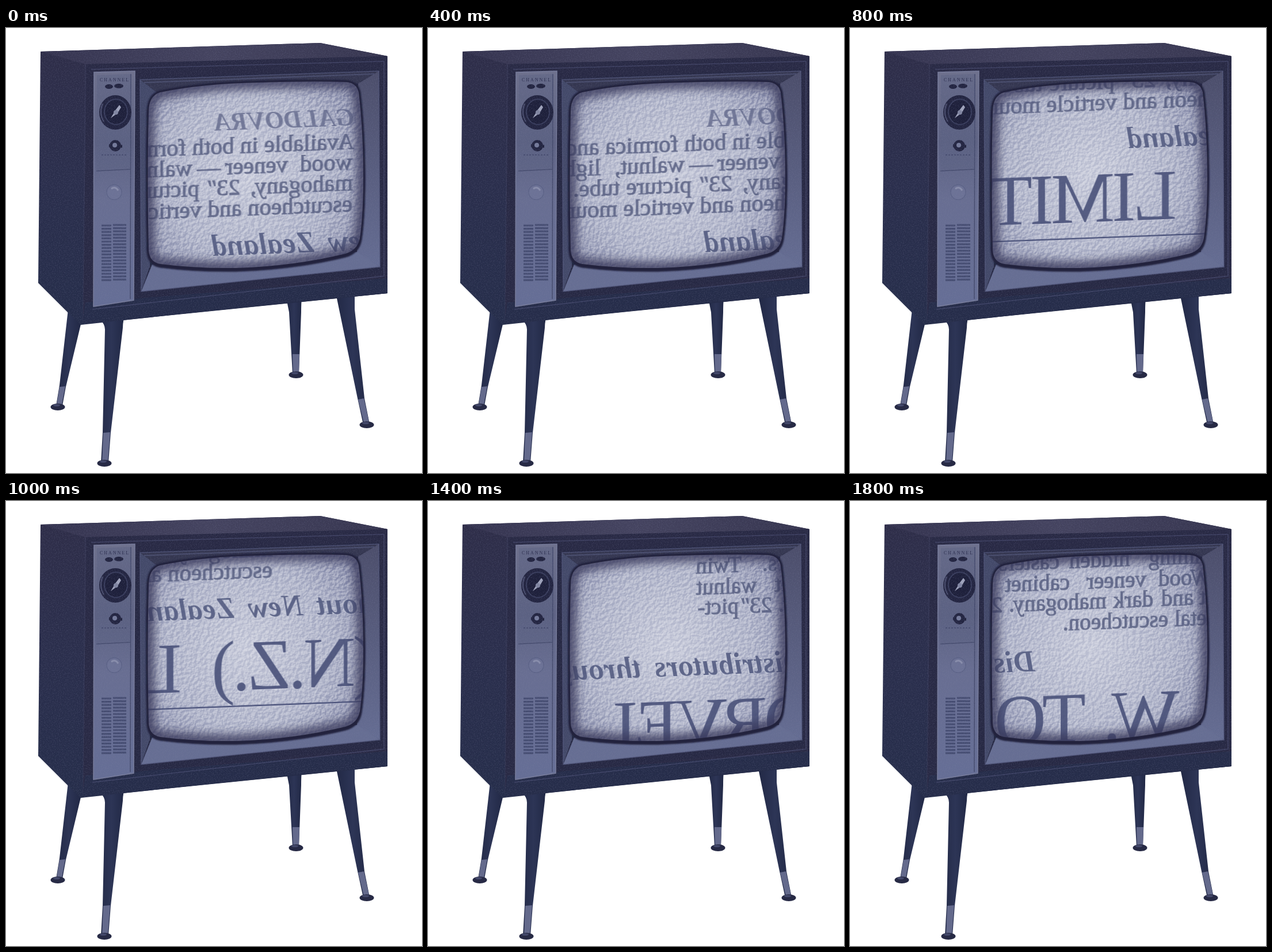
An HTML page that plays this animation: 723x775 px, repeating every 2 s.

```html
<!DOCTYPE html>
<html lang="en">
<head>
<meta charset="utf-8">
<title>Television set</title>
<style>
html, body { margin: 0; width: 100%; height: 100%; overflow: hidden; background: #fff; }
svg { display: block; width: 723px; height: 775px; }
text { font-family: "Liberation Serif", "Times New Roman", serif; }
.body { font-size: 41px; fill: #434b70; stroke: #434b70; stroke-width: 1.2; opacity: .74; }
.left { font-size: 39px; }
.brand { font: italic bold 45px "Liberation Serif", serif; fill: #555c80; opacity: .74; }
.line { font: italic bold 52px "Liberation Serif", serif; fill: #434c73; letter-spacing: .4px; word-spacing: 10px; opacity: .8; }
.firm { font-size: 125px; letter-spacing: -5px; fill: #3d4670; opacity: .84; }
#sheet { filter: drop-shadow(1.5px 1.5px .5px rgba(240,242,252,.4)); }
</style>
</head>
<body>
<svg viewBox="0 0 723 775">
  <defs>
    <linearGradient id="case" x1="0" y1="0" x2="0" y2="1">
      <stop offset="0" stop-color="#2e2d48"/><stop offset=".5" stop-color="#2a2e4c"/><stop offset="1" stop-color="#252d4a"/>
    </linearGradient>
    <linearGradient id="lid" x1="0" x2="1">
      <stop offset="0" stop-color="#34334f"/><stop offset=".5" stop-color="#44435f"/><stop offset="1" stop-color="#36354f"/>
    </linearGradient>
    <linearGradient id="panel" x1="0" y1="0" x2="0" y2="1">
      <stop offset="0" stop-color="#6e718d"/><stop offset=".3" stop-color="#5d6283"/><stop offset=".55" stop-color="#686e92"/><stop offset="1" stop-color="#656e96"/>
    </linearGradient>
    <linearGradient id="rim" x1="0" y1="0" x2="0" y2="1">
      <stop offset="0" stop-color="#4b4d6a"/><stop offset="1" stop-color="#656d93"/>
    </linearGradient>
    <linearGradient id="leg" x1="0" x2="1">
      <stop offset="0" stop-color="#222946"/><stop offset=".5" stop-color="#2d3556"/><stop offset="1" stop-color="#212845"/>
    </linearGradient>
    <radialGradient id="glow" gradientUnits="userSpaceOnUse" cx="420" cy="255" r="240">
      <stop offset="0" stop-color="#cacddc"/><stop offset=".6" stop-color="#b5b9cd"/><stop offset="1" stop-color="#9094b0"/>
    </radialGradient>
    <filter id="grain" x="0" y="0" width="1" height="1" color-interpolation-filters="sRGB">
      <feTurbulence type="fractalNoise" baseFrequency=".55" numOctaves="2" seed="4"/>
      <feColorMatrix values="0 0 0 0 .54  0 0 0 0 .55  0 0 0 0 .67  2.6 0 0 0 -1.1"/>
    </filter>
    <filter id="relief" x="0" y="0" width="1" height="1" color-interpolation-filters="sRGB">
      <feTurbulence id="noise" type="fractalNoise" baseFrequency=".17" numOctaves="3" result="n"/>
      <feColorMatrix in="n" values="0 0 0 0 0  0 0 0 0 0  0 0 0 0 0  1 0 0 0 0"/>
      <feDiffuseLighting surfaceScale="4" diffuseConstant="1" lighting-color="#fff">
        <feDistantLight azimuth="225" elevation="30"/>
      </feDiffuseLighting>
    </filter>
    <filter id="soft" x="-.2" y="-.2" width="1.4" height="1.4"><feGaussianBlur stdDeviation="8"/></filter>
    <filter id="haze" x="-.1" y="-.1" width="1.2" height="1.2"><feGaussianBlur stdDeviation="1.2"/></filter>
    <path id="tube" d="M248 146Q248 118 268 112Q340 97 440 95Q530 92 590 94Q609 95 613 112Q621 180 621 260Q621 325 615 366Q611 387 590 393Q500 415 400 418Q330 419 268 411Q250 408 248 388Q245 260 248 146Z"/>
    <path id="shell" d="M60 41L546 26L663 49V462L480 479L204 509L130 517L108 496L56 444Z"/>
    <clipPath id="tubeClip"><use href="#tube"/></clipPath>
    <clipPath id="shellClip"><use href="#shell"/></clipPath>
  </defs>

  <g id="legs"></g>

  <use href="#shell" fill="url(#case)"/>
  <path d="M60 41L546 26L663 49L138 63Z" fill="url(#lid)"/>
  <path d="M138 63L134 513" stroke="#3a3c5a" stroke-width="2" opacity=".5"/>
  <path d="M140 63L663 49V462L134 515Z" fill="#282944"/>
  <path d="M138 478L663 436V462L132 516Z" fill="#252c49"/>

  <!-- bezel -->
  <path d="M148 72L657 58V432L150 490" fill="none" stroke="#50557b" stroke-width="1.5" opacity=".55"/>
  <path d="M225 87L650 71L652 428L222 472Z" fill="#262843"/>
  <path d="M233 90L648 75L612 97L262 112Z" fill="#343650"/>
  <path d="M233 90L262 112L250 415L235 458Z" fill="#434969"/>
  <path d="M648 75L650 416L610 392L612 97Z" fill="url(#rim)"/>
  <path d="M235 459L254 412L610 390L650 416Z" fill="#666e93"/>
  <path d="M233 90L648 75L650 416L235 459Z" fill="none" stroke="#50557a" stroke-width="1.5" opacity=".8"/>
  <path d="M240 95L640 80" stroke="#484c6c" stroke-width="2"/>

  <!-- controls -->
  <path d="M153 77L224 75L222 474L152 485Z" fill="url(#panel)" stroke="#777c9b" stroke-width="1.5"/>
  <path d="M158 82L218 80L217 246L157 249Z" fill="#595f82" opacity=".45"/>
  <path d="M157 249L217 246M217 80L216 472" stroke="#464c6e" stroke-width="1.5" fill="none"/>
  <text x="189" y="93" text-anchor="middle" font-size="8" letter-spacing="2" fill="#2b2e4e">CHANNEL</text>
  <g fill="#222440">
    <ellipse cx="179" cy="102" rx="7" ry="4"/><ellipse cx="196" cy="101" rx="8" ry="4"/>
    <ellipse cx="190" cy="147" rx="28" ry="30"/>
    <circle cx="190" cy="205" r="10"/>
    <path d="M179 205L202 206" stroke="#222440" stroke-width="5"/>
  </g>
  <ellipse cx="191" cy="146" rx="20" ry="22" fill="#1d1f3a" stroke="#383c5c" stroke-width="2"/>
  <path d="M168 132Q161 148 170 163" fill="none" stroke="#4c5070" stroke-width="2"/>
  <path d="M182 157L191 142L197 134L200 138L194 148Z" fill="#a0a4bc"/>
  <circle cx="191" cy="147" r="4" fill="#8186a2"/>
  <circle cx="189" cy="204" r="4" fill="#747a9a"/>
  <path d="M166 221H211" stroke="#3c4165" stroke-width="2" stroke-dasharray="3 2" opacity=".6"/>
  <circle cx="188" cy="286" r="13" fill="#70769a" stroke="#565d82" stroke-width="1.5" opacity=".6"/>
  <path d="M183 280Q190 275 195 283" fill="none" stroke="#898eac" stroke-width="3"/>
  <g id="grille" stroke="#3e456a" stroke-width="3.2" fill="none" opacity=".8"></g>

  <g clip-path="url(#shellClip)"><rect x="50" y="20" width="620" height="500" filter="url(#grain)" opacity=".18"/></g>

  <!-- picture tube -->
  <g fill="none" stroke="#20223d" stroke-width="7" filter="url(#haze)">
    <use href="#tube"/><use href="#tube" y="3"/>
  </g>
  <g clip-path="url(#tubeClip)">
    <rect x="240" y="90" width="390" height="335" fill="url(#glow)"/>
    <rect x="240" y="90" width="390" height="335" filter="url(#relief)" opacity=".25" style="mix-blend-mode:overlay"/>
    <g id="sheet"></g>
    <use href="#tube" fill="none" stroke="#38395a" stroke-width="22" filter="url(#soft)" opacity=".85"/>
  </g>
</svg>
<script>
const $ = id => document.getElementById(id);
const add = (parent, tag, attrs, text) => {
  const el = document.createElementNS('http://www.w3.org/2000/svg', tag);
  for (const k in attrs) el.setAttribute(k, attrs[k]);
  if (text) el.textContent = text;
  parent.appendChild(el);
};

// Each leg: outline, metal tip, foot centre
[
  ['M487 470L514 470Q513 480 513 495L509 602H498L492 495Z', 'M498 568L510 568L509 600H499Z', 504, 604],
  ['M574 466L606 464V490L623 645L632 690L621 691L611 645Z', 'M612 647L622 645L631 686L622 688Z', 627, 691],
  ['M108 490L131 512L104 625L98 658H87L93 622Z', 'M93 625L103 624L97 656H88Z', 90, 660],
  ['M160 505L206 502Q203 512 203 522L182 705L178 757H165L168 705L172 525Q172 514 160 505Z', 'M169 705L181 704L177 755H167Z', 171, 758]
].forEach(([leg, tip, x, y]) => {
  const g = $('legs');
  add(g, 'path', { d: leg, fill: 'url(#leg)' });
  add(g, 'path', { d: tip, fill: '#646a8c' });
  add(g, 'ellipse', { cx: x, cy: y, rx: 12.5, ry: 6, fill: '#272a45' });
  add(g, 'ellipse', { cx: x - 2, cy: y - 3, rx: 6, ry: 2, fill: '#43486a' });
});

for (let y = 343; y < 443; y += 5.6)
  add($('grille'), 'path', { d: `M166 ${y + 1}H183M186 ${y}H209` });

// The printed sheet: [class, baseline, [start, words]...]
[
  ['brand', -218, [606, 'GALDOVRA']],
  ['body left', -177, [-342, 'trimming'], [-165, 'hidden'], [-42, 'casters.'], [110, 'Twin']],
  ['body left', -140, [-306, 'Wood'], [-193, 'veneer'], [-60, 'cabinet'], [83, 'walnut']],
  ['body left', -105.5, [-335, 'nut'], [-275, 'and'], [-205, 'dark'], [-124, 'mahogany.'], [57, '23″'], [115, 'pict-']],
  ['body left', -69, [-328, 'metal'], [-231, 'escutcheon.']],
  ['body', -177, [606, 'Available in both formica and']],
  ['body', -141, [609, 'wood'], [721, 'veneer'], [838, '—'], [887, 'walnut,'], [1033, 'light']],
  ['body', -105, [608, 'mahogany,'], [804, '23″'], [875, 'picture'], [1000, 'tube.']],
  ['body', -68, [609, 'escutcheon and verticle mount']],
  ['line', 0, [0, 'Distributors throughout New Zealand']],
  ['firm', 126.5, [-250, 'W.'], [-88, 'TORVEL'], [428, '(N.Z.)'], [767, 'LIMITED']]
].forEach(([cls, y, ...runs]) =>
  runs.forEach(([x, words]) => add($('sheet'), 'text', { class: cls, x, y }, words)));
add($('sheet'), 'path', { d: 'M-300 154H1300', stroke: '#4a527a', 'stroke-width': 2.5 });

// Sheet position for each 200 ms step: right, down, then back along the foot
const poses = [
  [1211, 364.6], [1272, 361.3], [1333, 358], [1333, 275], [1335, 177],
  [1072, 178], [809, 179.7], [655, 296.4], [500, 296.4], [322, 296.5]
];
let shown = -1;
function draw(now) {
  const step = Math.floor(now % 2000 / 200);
  if (step !== shown) {
    shown = step;
    const [x, y] = poses[step];
    $('sheet').setAttribute('transform', `matrix(-1 .038 0 1 ${x} ${y})`);
    $('noise').setAttribute('seed', step + 1);
  }
}
const start = performance.now();
function tick() {
  draw(performance.now() - start);
  requestAnimationFrame(tick);
}
draw(0);
requestAnimationFrame(tick);
</script>
</body>
</html>
```
